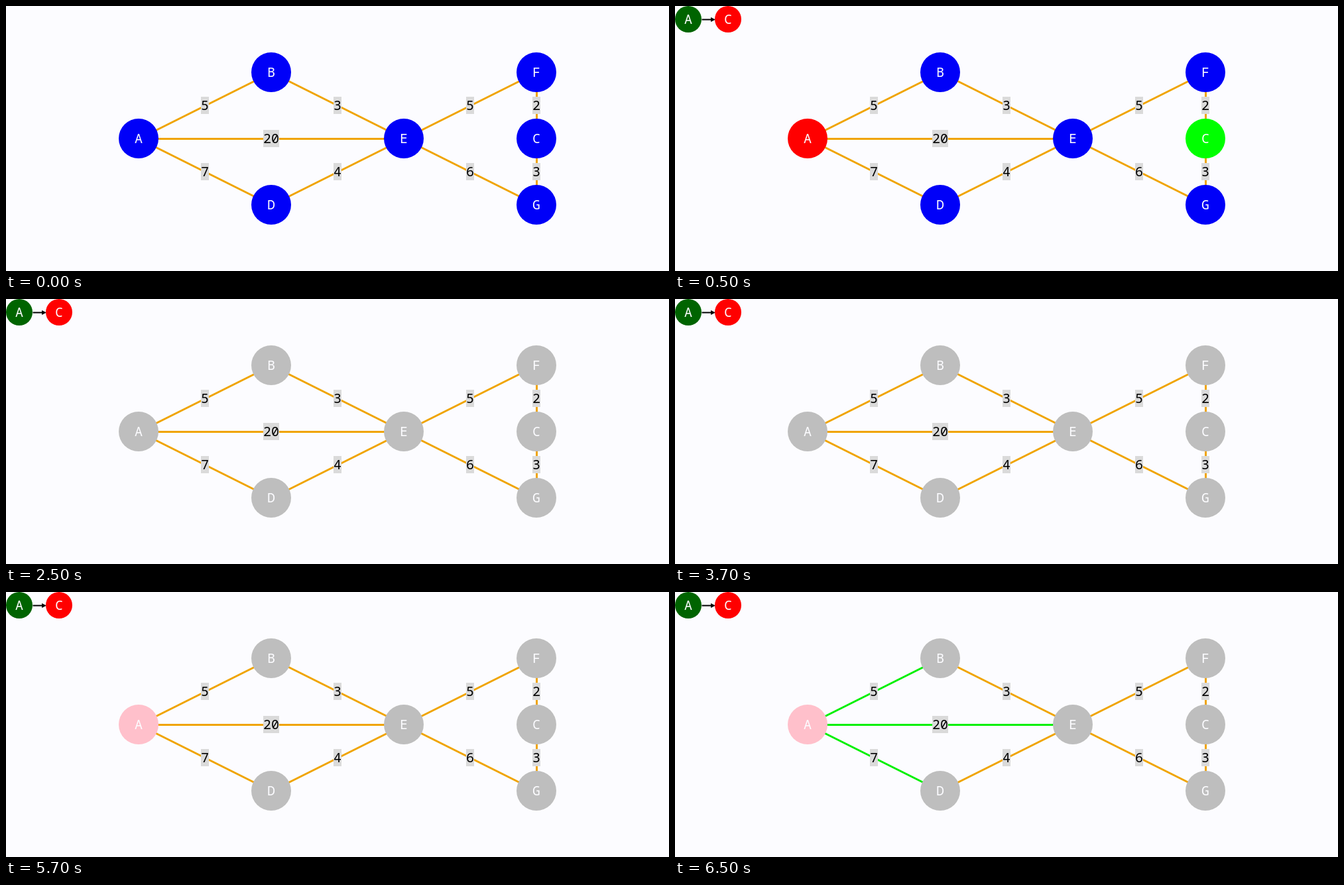
Recreate the animation shown at these times as an HTML page with a canvas. Size 1000x400 px, loop 8000 ms.

```html
<!DOCTYPE html>
<html lang="en">
<head>
<meta charset="utf-8">
<title>Shortest path</title>
<style>
  html, body { margin: 0; width: 100%; height: 100%; overflow: hidden; background: #fcfcff; }
  canvas { display: block; }
</style>
</head>
<body>
<canvas id="stage" width="1000" height="400"></canvas>
<script>
const ctx = document.getElementById('stage').getContext('2d');
const LOOP = 8000;
const ORANGE = '#f0a400', LIME = '#00ff00', GREEN = '#00f000', RED = '#ff0000', BLUE = '#0000f8';
const GRAY = '#bebebe', PINK = '#ffc0cb', SILVER = '#dadada', WHITE = '#fcfcff';

const nodes = {
  A: [200, 200], B: [400, 100], C: [800, 200], D: [400, 300],
  E: [600, 200], F: [800, 100], G: [800, 300]
};
const edges = [
  ['A', 'B', 5], ['A', 'E', 20], ['A', 'D', 7], ['B', 'E', 3], ['D', 'E', 4],
  ['E', 'F', 5], ['E', 'G', 6], ['F', 'C', 2], ['C', 'G', 3]
];

// Lines run through pixel centres.
function line(x1, y1, x2, y2, color, width) {
  ctx.strokeStyle = color;
  ctx.lineWidth = width;
  ctx.beginPath();
  ctx.moveTo(x1 + 0.5, y1 + 0.5);
  ctx.lineTo(x2 + 0.5, y2 + 0.5);
  ctx.stroke();
}

function label(text, x, y, color) {
  ctx.fillStyle = color;
  ctx.fillText(text, x, y + 7);
}

function disc(name, x, y, r, color) {
  ctx.fillStyle = color;
  ctx.beginPath();
  ctx.arc(x, y, r, 0, 2 * Math.PI);
  ctx.fill();
  label(name, x, y, WHITE);
}

function drawEdge([from, to, cost], active) {
  const [x1, y1] = nodes[from], [x2, y2] = nodes[to];
  const x = (x1 + x2) / 2, y = (y1 + y2) / 2;
  line(x1, y1, x2, y2, active ? GREEN : ORANGE, 3);
  const w = 12 * String(cost).length;
  ctx.fillStyle = SILVER;
  ctx.fillRect(x - w / 2, y - 13, w, 26);
  label(cost, x, y, '#000');
}

function drawRoute() {
  line(40, 20, 56, 20, '#000', 2);
  ctx.fillStyle = '#000';
  ctx.beginPath();
  ctx.moveTo(61, 20.5);
  ctx.lineTo(54, 17);
  ctx.lineTo(54, 24);
  ctx.fill();
  disc('A', 20, 20, 20, '#006400');
  disc('C', 80, 20, 20, RED);
}

function nodeColor(name, t) {
  if (t >= 2500) return name === 'A' && t >= 4500 ? PINK : GRAY;
  if (t >= 500 && name === 'A') return RED;
  if (t >= 500 && name === 'C') return LIME;
  return BLUE;
}

function draw(now) {
  const t = now % LOOP;
  ctx.fillStyle = WHITE;
  ctx.fillRect(0, 0, 1000, 400);
  ctx.font = '20px "Noto Sans Mono", monospace';
  ctx.textAlign = 'center';
  for (const edge of edges) drawEdge(edge, t >= 6500 && edge[0] === 'A');
  for (const name in nodes) disc(name, ...nodes[name], 30, nodeColor(name, t));
  if (t >= 500) drawRoute();
}

const start = performance.now();
function tick() {
  draw(performance.now() - start);
  requestAnimationFrame(tick);
}
tick();
</script>
</body>
</html>
```
